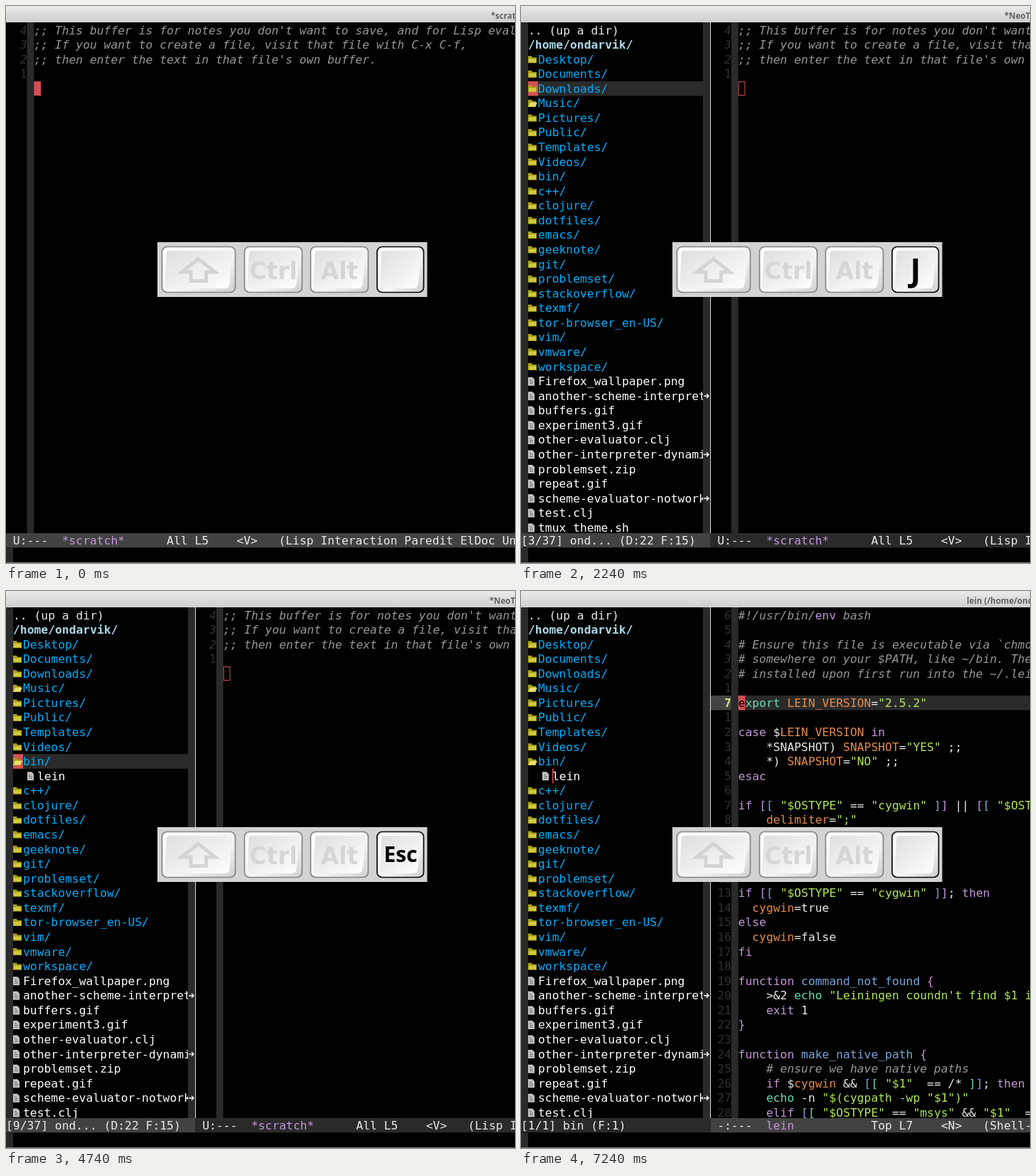
Recreate the animation shown at these times as an HTML page. Size 716 by 783 pixels, loop 7820 ms.

```html
<!DOCTYPE html>
<html lang="en">
<head>
<meta charset="utf-8">
<title>File tree demo</title>
<style>
html, body { margin: 0; width: 100%; height: 100%; overflow: hidden; background: #000; }
svg { display: block; width: 716px; height: 783px; }
text { white-space: pre; }
.mono { font: 16.33px "DejaVu Sans Mono", monospace; fill: #eaeaea; }
.comment { fill: #969896; font-style: italic; }
.keyword { fill: #c397d8; font-style: normal; }
.builtin { fill: #68dcb0; }
.name { fill: #7aa6da; }
.variable { fill: #e78c45; }
.string { fill: #b2e853; }
.number { fill: #303030; }
.slanted { font-style: italic; }
.current { fill: #cae682; font-weight: bold; }
.dir { fill: #00afff; }
.file { fill: #fff; }
.root { fill: #add8e6; font-weight: bold; }
.title { font: bold 11.6px "Open Sans", sans-serif; fill: #626262; }
.cap { font: bold 33px "DejaVu Sans", sans-serif; fill: #d6d6d6; text-anchor: middle; }
.label { font: bold 45px "Open Sans", sans-serif; fill: #000; text-anchor: middle; }
.label.enter { font-size: 25.6px; }
.label.small { font-size: 30px; }
</style>
</head>
<body>
<svg viewBox="0 0 716 783">
  <defs>
    <linearGradient id="bar" x2="0" y2="1"><stop stop-color="#ebebeb"/><stop offset="1" stop-color="#cecece"/></linearGradient>
    <linearGradient id="side" x2="1" y2="1"><stop stop-color="#fff"/><stop offset=".6" stop-color="#f4f4f4"/><stop offset="1" stop-color="#cfcfcf"/></linearGradient>
    <linearGradient id="face" x2="1" y2="1"><stop stop-color="#dedede"/><stop offset="1" stop-color="#fff"/></linearGradient>
    <clipPath id="tree"><path d="M0 23H256V741H0Z"/></clipPath>
    <g id="closed"><path d="M0 1h5l1 2h6v8H0z" fill="#a8a018"/><path d="M1 5h10v5H1z" fill="#d2ca3c"/></g>
    <g id="open"><path d="M0 1h5l1 2h5v8H0z" fill="#a8a018"/><path d="M3 5h10l-3 6H0z" fill="#e6df68"/></g>
    <g id="doc"><path d="M0 0h6l3 3v9H0z" fill="#c4c4c4"/><path d="M2 4h3M2 6.5h5M2 9h5" stroke="#666"/></g>
  </defs>
  <g id="stage"></g>
</svg>
<script>
const LOOP = 7820, CW = 9.83, ROW = 20.57, SPLIT = 266.3;
const RED = '#d54e53', DIM = '#2a2a2a', LIT = '#424242';
const USER = 'ondarvik';

const notes = [
  ";; This buffer is for notes you don't want to save, and for Lisp evaluation.",
  ';; If you want to create a file, visit that file with C-x C-f,',
  ";; then enter the text in that file's own buffer.", '', ''];

const dirs = ('Desktop Documents Downloads Music Pictures Public Templates Videos bin c++ clojure dotfiles ' +
  'emacs geeknote git problemset stackoverflow texmf tor-browser_en-US vim vmware workspace').split(' ');
const files = ('Firefox_wallpaper.png another-scheme-interpreter buffers.gif experiment3.gif other-evaluator.clj ' +
  'other-interpreter-dynamic problemset.zip repeat.gif scheme-evaluator-notworking test.clj tmux_theme.sh').split(' ');

const script = `#!/usr/bin/env bash

# Ensure this file is executable via \`chmod a+x lein\`, then place it
# somewhere on your $PATH, like ~/bin. The rest of Leiningen will be
# installed upon first run into the ~/.lein/self-installs directory.

export LEIN_VERSION="2.5.2"

case $LEIN_VERSION in
    *SNAPSHOT) SNAPSHOT="YES" ;;
    *) SNAPSHOT="NO" ;;
esac

if [[ "$OSTYPE" == "cygwin" ]] || [[ "$OSTYPE" == "msys" ]]; then
    delimiter=";"
else
    delimiter=":"
fi

if [[ "$OSTYPE" == "cygwin" ]]; then
  cygwin=true
else
  cygwin=false
fi

function command_not_found {
    >&2 echo "Leiningen coundn't find $1 in your $PATH."
    exit 1
}

function make_native_path {
    # ensure we have native paths
    if $cygwin && [[ "$1"  == /* ]]; then
    echo -n "$(cygpath -wp "$1")"
    elif [[ "$OSTYPE" == "msys" && "$1"  == /?/* ]]; then`.split('\n');

// Each entry changes part of the state from its time on.
const events = [
  [0, { key: '', pane: 'notes', title: 'notes', row: 0, col: 0 }],
  [550, { key: 'F8' }], [600, { pane: 'tree' }], [650, { title: 'tree' }], [1100, { key: '' }],
  [1570, { key: 'J' }],
  ...[1610, 1960, 2090, 2240, 2450, 2610, 2750, 2870, 3030, 3190].map((t, i) => [t, { row: i + 1 }]),
  [3290, { key: 'L' }], [3330, { col: 1 }],
  [3720, { key: 'I' }], [3760, { insert: true, echo: '-- INSERT --' }],
  [4010, { key: 'Enter' }], [4050, { expanded: true, echo: '' }], [4570, { key: '' }],
  [4700, { key: 'Esc' }], [4740, { insert: false, col: 0 }],
  [4970, { key: 'J' }], [5010, { row: 11 }],
  [5150, { key: 'L' }], [5190, { col: 1 }],
  [5410, { key: 'I' }], [5450, { insert: true, echo: '-- INSERT --' }],
  [5650, { key: 'Enter' }], [5740, { pane: 'script', line: 5, echo: '' }], [5790, { title: 'script' }],
  [6180, { key: '' }], [6220, { echo: 'Indentation setup for shell type bash' }],
  [6720, { key: 'J', line: 6, echo: '' }], [7240, { key: '' }]];

const esc = s => s.replace(/&/g, '&amp;').replace(/</g, '&lt;');
const rowTop = row => 23.5 + ROW * row;
const rect = (x, y, w, h, fill, more = '') =>
  `<rect x="${x}" y="${y}" width="${w}" height="${h}" fill="${fill}" ${more}/>`;
const label = (x, y, html, cls = 'mono') => `<text x="${x}" y="${y}" class="${cls}">${html}</text>`;
const cell = (x, row, html, cls = '') => label(x, rowTop(row) + 16, html, 'mono ' + cls);
const icon = (id, x, row) => `<use href="#${id}" x="${x}" y="${rowTop(row) + 4.5}"/>`;
const span = (cls, s) => `<tspan class="${cls}">${esc(s)}</tspan>`;

const tokens = /(?<string>"\$\(.*\)"|"[^"]*")|(?<name>(?<=function )\w+)|(?<keyword>\b(?:case|in|esac|if|then|else|elif|fi|function|exit)\b)|(?<builtin>\b(?:export|echo)\b)|(?<variable>\b\w+(?==)|(?<=\$)\w+)|(?<opening>[[{])|(?<closing>[\]}])|[^]/g;
const depthColors = ['keyword', 'name', 'builtin'];
let depth = 0;

function highlight(line) {
  if (line.startsWith('#!')) return span('comment', '#!/usr/bin/') + span('keyword', 'env') + span('comment', ' bash');
  if (/^\s*#/.test(line)) return span('comment', line);
  return line.replace(tokens, (s, ...rest) => {
    const groups = rest.at(-1);
    if (groups.opening) return span(depthColors[depth++], s);
    if (groups.closing) return span(depthColors[--depth], s);
    const cls = Object.keys(groups).find(k => groups[k]);
    return cls ? span(cls, s) : esc(s);
  });
}
const scriptRows = script.map(highlight);

function modeLine(x, width, fill, flags, name, place, state, modes) {
  return rect(x, 741, width, 20.5, fill) + label(x + CW, 757,
    `${flags}  <tspan class="keyword">${name}</tspan>${' '.repeat(15 - name.length)}${place}    &lt;${state}>   ${modes}`);
}

// Line numbers relative to the current line.
function gutter(x, lines, count, current) {
  let out = rect(x + 3 * CW, 23, CW, 718, DIM);
  for (let i = 0; i < count; i++) {
    const active = i === current;
    const n = String(active ? i + 1 : Math.abs(i - current));
    const cls = active ? 'current' : /^(;;|#)/.test(lines[i]) ? 'number slanted' : 'number';
    if (active) out += rect(x, rowTop(i), 3 * CW, ROW, '#444');
    out += cell(x + (3 - n.length) * CW, i, n, cls);
  }
  return out;
}

function notesPane(x, focused) {
  const tx = x + 4 * CW;
  const cursor = focused ? rect(tx, 106, CW, 20, RED)
    : rect(tx + .5, 106.5, CW - 1, 19, 'none', `stroke="${RED}"`);
  return gutter(x, notes, 4, 4) + notes.map((s, i) => cell(tx, i, esc(s), 'comment')).join('') + cursor +
    modeLine(x, 716 - x, focused ? LIT : DIM, 'U:---', '*scratch*', 'All L5', 'V', '(Lisp Interaction Paredit ElDoc Undo-Tree)');
}

function scriptPane(line) {
  const tx = SPLIT + 4 * CW;
  return rect(tx, rowTop(line), 716 - tx, ROW, DIM) + gutter(SPLIT, script, script.length, line) +
    scriptRows.map((html, i) => cell(tx, i, html)).join('') +
    rect(tx, rowTop(line), CW, ROW, RED) + cell(tx, line, `<tspan fill="#000">${script[line][0] || ''}</tspan>`) +
    modeLine(SPLIT, 450, LIT, '-:---', 'lein', `Top L${line + 1}`, 'N', '(Shell-script[bash] Undo-Tree)');
}

function treeStatus(row) {
  const user = USER.slice(0, 3) + '...';
  if (row === 0) return '[6/23]  (D:21 F:2)';
  if (row === 1) return `${user} (D:22 F:15)`;
  return row === 11 ? '[1/1] bin (F:1)' : `[${row - 1}/37] ${user} (D:22 F:15)`;
}

function treeRows(expanded) {
  const rows = [{ text: '.. (up a dir)', x: 10 }, { text: `/home/${USER}/`, cls: 'root', x: 10 }];
  for (const d of dirs) {
    const isOpen = d === 'Music' || (d === 'bin' && expanded);
    rows.push({ text: d + '/', cls: 'dir', icon: isOpen ? 'open' : 'closed', x: 24 });
    if (d === 'bin' && expanded) rows.push({ text: 'lein', cls: 'file', icon: 'doc', x: 44 });
  }
  for (const f of files) rows.push({ text: f, cls: 'file', icon: 'doc', x: 24 });
  return rows.slice(0, 35);
}

function treePane(s) {
  const focused = s.pane === 'tree';
  const rows = treeRows(s.expanded);
  const here = rows[s.row], y = rowTop(s.row);
  const block = focused && !s.insert;
  const blockX = s.col ? here.x : 10;
  const blockW = blockX < here.x && here.x === 24 ? 14 : CW;
  let out = rect(0, 23, 10, 718, DIM) + rect(256, 23, 10, 718, DIM);
  if (focused) out += rect(10, y, 246, ROW, DIM);
  if (block) out += rect(blockX, y, blockW, ROW, RED);
  out += '<g clip-path="url(#tree)">';
  rows.forEach((r, i) => {
    const covered = block && r === here && blockX === r.x;
    const text = covered ? `<tspan fill="#000">${r.text[0]}</tspan>${r.text.slice(1)}` : r.text;
    out += cell(r.x, i, text, r.cls) + (r.icon ? icon(r.icon, r.x - 14, i) : '');
  });
  out += '</g>';
  rows.forEach((r, i) => {
    if (r.text.length > 23)
      out += `<path d="M257 ${rowTop(i) + 10.5}h7m-3-3l3 3-3 3" fill="none" stroke="#fff" stroke-width="1.4"/>`;
  });
  if (s.insert) out += rect(here.x, y, 1.5, ROW, RED);
  return out + rect(0, 741, SPLIT, 20.5, focused ? LIT : DIM) + label(0, 757, treeStatus(s.row)) +
    rect(266, 23, 1, 718, '#d8d8d8');
}

function keyCap(x, w, stroke, inner) {
  return rect(x, 338.5, w, 64, 'url(#side)', `rx="7" stroke="${stroke}" stroke-width="1.7"`) +
    `<path d="M${x + 10} 344H${x + w - 5}Q${x + w - 3} 344 ${x + w - 4} 350L${x + w - 8} 391Q${x + w - 9} 397 ${x + w - 15} 397H${x + 8}Q${x + 4} 397 ${x + 4} 391L${x + 6} 349Q${x + 6} 344 ${x + 10} 344Z" fill="url(#face)"/>` + inner;
}

function keyLabel(key) {
  if (key === 'Enter') return label(566.5, 366, key, 'label enter') +
    '<path d="M556 373.5h-6v8.5h-7v-5l-10.5 7.5 10.5 8v-5h13z" fill="#fff" stroke="#000" stroke-width="2.8"/>';
  if (key === 'Esc') return label(555, 381, key, 'label small');
  return label(555, 387, key, 'label');
}

function keyboard(key) {
  const wide = key === 'Enter';
  return rect(213, 332, wide ? 419 : 379.5, 77, '#d3d3d3') +
    keyCap(219.5, 103, '#858585', '<path d="M270.5 355.5L294 374H281.5V386.500H260V374H247Z" fill="none" stroke="#d4d4d4" stroke-width="5"/>') +
    keyCap(335.5, 81, '#858585', label(376, 384, 'Ctrl', 'cap')) +
    keyCap(428.5, 81, '#858585', label(469, 384, 'Alt', 'cap')) +
    keyCap(522, wide ? 104 : 65.5, '#0a0a0a', keyLabel(key));
}

const titles = {
  notes: [682, '*scratch*'],
  tree: [680, '*NeoTree*'],
  script: [627, `lein (/home/${USER}/bin)`]
};

function draw(s) {
  const [titleX, title] = titles[s.title];
  const body = s.pane === 'notes' ? notesPane(0, true)
    : (s.pane === 'tree' ? notesPane(SPLIT, false) : scriptPane(s.line)) + treePane(s);
  return rect(0, 0, 716, 783, '#000') + body +
    rect(0, 0, 716, 23, 'url(#bar)') + label(titleX, 17.5, title, 'title') +
    rect(0, 761.5, 716, 21, '#000') + rect(0, 761.5, 10, 21, DIM) + label(10, 777.5, s.echo || '') +
    rect(0, 782, 716, 1, '#777') + keyboard(s.key);
}

const stage = document.getElementById('stage');
let shown = -1;

function update(now) {
  const t = now % LOOP;
  const index = events.findLastIndex(e => e[0] <= t);
  if (index !== shown) {
    shown = index;
    stage.innerHTML = draw(Object.assign({}, ...events.slice(0, index + 1).map(e => e[1])));
  }
}

const startTime = performance.now();
function tick() {
  update(Math.max(0, performance.now() - startTime));
  requestAnimationFrame(tick);
}
tick();
</script>
</body>
</html>
```
